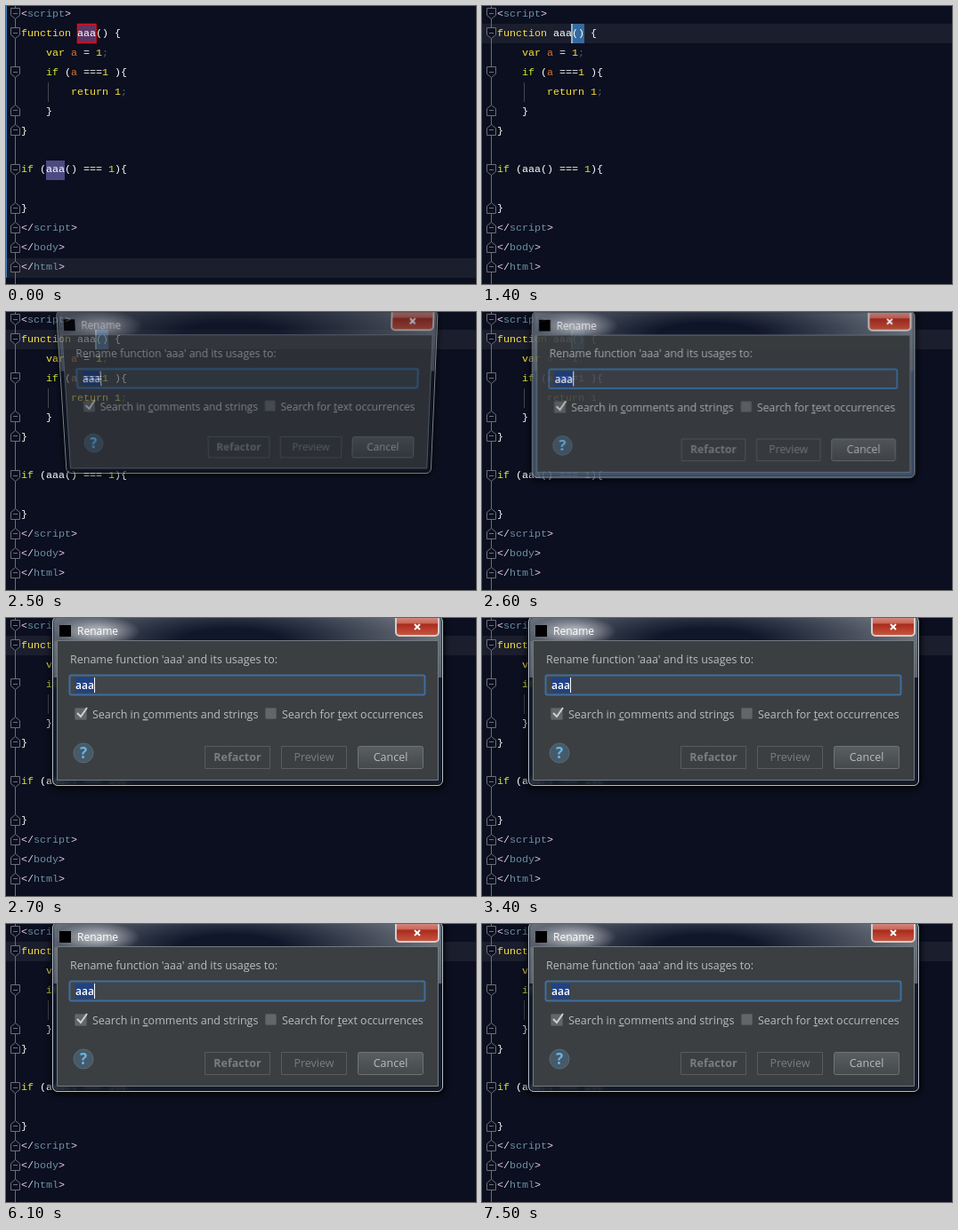
An HTML page that plays this animation: 528x313 px, repeating every 8000 ms.

```html
<!DOCTYPE html>
<html lang="en">
<head>
<meta charset="utf-8">
<title>Rename function</title>
<style>
  html, body { margin: 0; width: 100%; height: 100%; overflow: hidden; background: #0b0f1f; }
  svg, pre, #dialog { position: absolute; left: 0; top: 0; }
  pre {
    margin: 0; left: 17px; top: -1px; color: #fff;
    font: 11.667px/21.92px "Liberation Mono", monospace;
  }
  pre i { font-style: normal; }
  .p { color: #f0d2f0; } .n { color: #6c90a4; } .k { color: #f8e23c; }
  .y { color: #d6ea2e; } .v { color: #d9722a; } .s { color: #59606a; }
  #dialog { width: 528px; height: 313px; transform-origin: 0 0; }
  #glass {
    position: absolute; left: 52px; top: -2px; width: 437px; height: 189px;
    border: 1px solid #b4c0cc; border-radius: 6px; backdrop-filter: blur(3px);
    background:
      radial-gradient(48px 17px at 50px 16px, #c4c8cecc 20%, #c4c8ce00) no-repeat,
      radial-gradient(230px 60px at 200px 28px, #10172a 25%, #10172a00) 0 0 / 100% 27px no-repeat,
      linear-gradient(#7c838ce0, #666d76e0) 0 0 / 100% 68px no-repeat;
    box-shadow: inset 0 0 0 1px #0008, 0 1px 6px 2px #000c;
  }
  #dialog text { font: 12.5px "Open Sans", sans-serif; fill: #bbb; }
  #dialog .off { fill: #7b7e80; }
</style>
</head>
<body>
<svg width="528" height="313">
  <g id="before">
    <path d="M0 284H528V306H0Z" fill="#1b1e2d"/>
    <path d="M0 0H1V306H0Z" fill="#3f7fbf"/>
    <path d="M80.5 20.5H101V41.5H80.5Z" fill="#5b3566" stroke="#f00808" stroke-width="1.5"/>
    <path d="M45 174H66V196H45Z" fill="#4b4a83"/>
  </g>
  <g id="after">
    <path d="M0 20H528V42H0Z" fill="#1b1e2d"/>
    <path d="M101 20H115V42H101Z" fill="#36699d"/>
    <path id="caret" d="M100 20H102V42H100Z" fill="#8fb4d8"/>
  </g>
  <path d="M47.5 86V108" stroke="#45464f"/>
  <g id="folds" fill="#0b0f1f" stroke="#6d6e76"><path d="M10.5 0V313"/></g>
</svg>
<pre><i class="p">&lt;</i><i class="n">script</i><i class="p">&gt;</i>
<i class="k">function</i> aaa() {
    <i class="k">var</i> <i class="v">a</i> = <i class="k">1</i><i class="s">;</i>
    <i class="y">if</i> (<i class="v">a</i> ===<i class="k">1</i> ){
        <i class="k">return 1</i><i class="s">;</i>
    }
}

<i class="y">if</i> (aaa() === <i class="y">1</i>){

}
<i class="p">&lt;/</i><i class="n">script</i><i class="p">&gt;</i>
<i class="p">&lt;/</i><i class="n">body</i><i class="p">&gt;</i>
<i class="p">&lt;/</i><i class="n">html</i><i class="p">&gt;</i></pre>

<div id="dialog">
  <div id="glass"></div>
  <svg width="528" height="313">
    <defs>
      <linearGradient id="red" x2="0" y2="1">
        <stop stop-color="#dba79f"/><stop offset=".45" stop-color="#c9675a"/>
        <stop offset=".5" stop-color="#a92b1f"/><stop offset="1" stop-color="#c9573f"/>
      </linearGradient>
      <linearGradient id="grey" x2="0" y2="1">
        <stop stop-color="#595e60"/><stop offset="1" stop-color="#45494b"/>
      </linearGradient>
    </defs>
    <path d="M60 8H73V21H60Z" fill="#000"/>
    <text x="80" y="19" style="font-size:12px;fill:#fff">Rename</text>
    <rect x="438" y="-6" width="48" height="26" rx="4" fill="url(#red)" stroke="#d8cccc" stroke-width="2"/>
    <path d="M459 7L465 13M465 7L459 13" stroke="#fff" stroke-width="2"/>

    <path d="M57.5 25.5H485.5V182.5H57.5Z" fill="#3c3f41" stroke="#737a80"/>
    <text x="72" y="51">Rename function 'aaa' and its usages to:</text>
    <rect x="71.5" y="64.5" width="399" height="22" rx="2" fill="#404549" stroke="#3d6f9f" stroke-width="2"/>
    <path d="M78 67H99V84H78Z" fill="#214283"/>
    <text x="78" y="80" style="font-size:12px;font-weight:600;fill:#fff">aaa</text>
    <path id="fieldCaret" d="M99 67H100V84H99Z" fill="#fff"/>

    <g fill="#626668" stroke="#54585a">
      <rect x="77.5" y="101.5" width="13" height="13" rx="1"/>
      <rect x="291.5" y="101.5" width="12" height="12" rx="1"/>
    </g>
    <path d="M80 107L84 111L91 101" fill="none" stroke="#d0d0d0" stroke-width="2"/>
    <text x="97" y="113">Search in <tspan text-decoration="underline">c</tspan>omments and strings</text>
    <text x="310" y="113">Search for <tspan text-decoration="underline">t</tspan>ext occurrences</text>

    <circle cx="87" cy="152" r="11" fill="#475a68" stroke="#566a78"/>
    <rect x="395.5" y="144.5" width="73" height="25" rx="2" fill="url(#grey)" stroke="#6f7375"/>
    <path d="M223.5 144.5H296.5V169.5H223.5ZM309.5 144.5H382.5V169.5H309.5Z" fill="none" stroke="#595c5e"/>
    <g text-anchor="middle">
      <text x="87" y="158" style="font-size:17px;font-weight:700;fill:#68b5ea">?</text>
      <text class="off" x="260" y="161" style="font-weight:700">Refactor</text>
      <text class="off" x="346" y="161">Preview</text>
      <text x="432" y="161">Cancel</text>
    </g>
  </svg>
</div>

<script>
const $ = id => document.getElementById(id);
const show = (id, on) => $(id).style.visibility = on ? 'visible' : 'hidden';

// Fold markers: openings point down, closings point up.
const fold = (row, dir) => {
  const y = 22 * row + 8 + dir / 2;
  return `<path d="M5.5 ${y - 6 * dir}H15.5V${y + 2 * dir}L10.5 ${y + 6 * dir}L5.5 ${y + 2 * dir}ZM8 ${y}H13"/>`;
};
$('folds').innerHTML += [0, 1, 3, 8].map(r => fold(r, 1)).join('') +
  [5, 6, 10, 11, 12, 13].map(r => fold(r, -1)).join('');

// The window opens in three steps, first tilted, then slightly small.
const opening = [
  { at: 2500, opacity: .66, tint: '#10151f', transform: 'matrix3d(.978,0,0,0, .078,1.0067,0,.00025, 0,0,1,0, 5.3,.24,0,1)' },
  { at: 2600, opacity: .9, tint: '#455a74', transform: 'matrix(.98,0,0,.983,5.2,.9)' },
  { at: 2700, opacity: 1, tint: '#1a2230b0', transform: 'none' }
];
const caretFlips = [500, 1000, 1400, 1900, 2400];
const fieldFlips = [2500, 2900, 3400, 3800, 4300, 4700, 5200, 5700, 6100, 6600, 7000, 7500];
const isOn = (flips, t) => flips.filter(f => f <= t).length % 2 === 1;

function draw(now) {
  const t = now % 8000;
  const step = opening.filter(s => s.at <= t).pop();
  show('before', t < 500);
  show('after', t >= 500);
  show('caret', isOn(caretFlips, t));
  show('dialog', step);
  show('fieldCaret', isOn(fieldFlips, t));
  if (step) {
    const { opacity, transform, tint } = step;
    Object.assign($('dialog').style, { opacity, transform });
    $('glass').style.backgroundColor = tint;
  }
  requestAnimationFrame(draw);
}
draw(performance.now());
</script>
</body>
</html>
```
